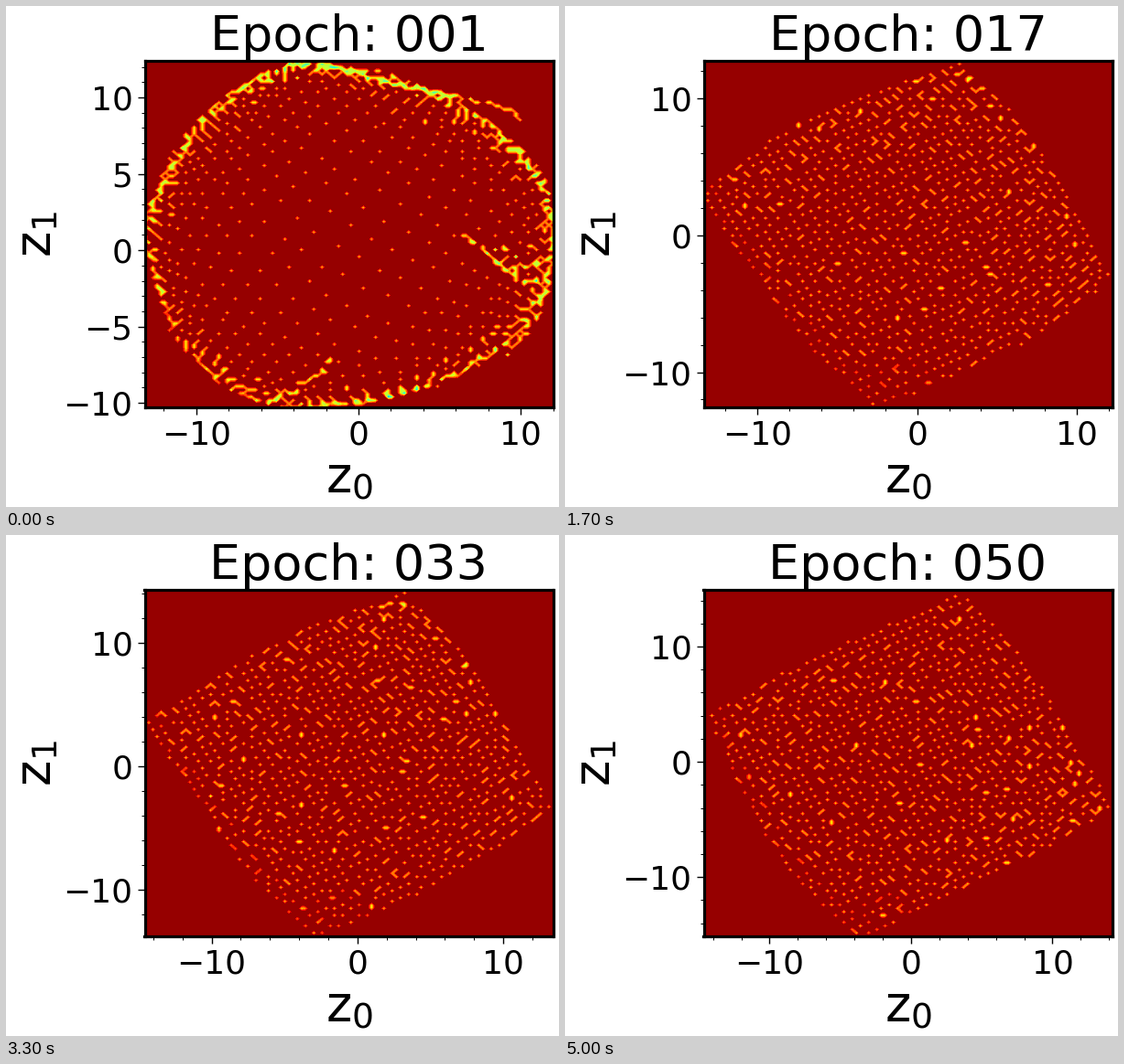
Recreate the animation shown at these times as a matplotlib script. Size 604 by 548 pixels, loop 5.1 s.

```python
import numpy as np
import matplotlib.pyplot as plt
from matplotlib.animation import FuncAnimation
from matplotlib.ticker import AutoMinorLocator, MultipleLocator

WIDTH, HEIGHT = 604, 548
LEFT, RIGHT, TOP, BOTTOM = 151.5, 597.5, 59.5, 439
BINS, SIDE, EPOCHS = 100, 32, 50

KEY_EPOCHS = [1, 13, 21, 28, 37, 44, 50]
# x min, x max, y min, y max
LIMITS = [
    (-13.18, 12.00, -10.29, 12.43),
    (-12.47, 11.25, -11.27, 11.73),
    (-14.23, 13.13, -13.87, 13.83),
    (-14.41, 13.12, -13.16, 13.47),
    (-14.74, 13.66, -14.34, 15.08),
    (-14.09, 12.94, -14.24, 14.53),
    (-14.66, 14.21, -15.14, 14.96),
]
# Cloud outline: left, top, right, bottom corners, then the middles between them
OUTLINES = [
    [(153, 235), (320, 60), (590, 190), (420, 428),
     (215, 125), (480, 98), (575, 340), (230, 412)],
    [(157, 212), (425, 64), (588, 295), (350, 436),
     (280, 122), (515, 160), (505, 375), (230, 325)],
    [(156, 192), (440, 66), (596, 288), (325, 428),
     (290, 118), (515, 160), (475, 365), (228, 312)],
    [(158, 202), (440, 68), (594, 298), (330, 435),
     (300, 125), (520, 165), (480, 372), (232, 315)],
    [(156, 207), (434, 63), (587, 295), (335, 435),
     (290, 122), (515, 160), (475, 375), (235, 325)],
    [(155, 195), (440, 64), (594, 297), (322, 432),
     (290, 125), (525, 165), (465, 365), (222, 300)],
    [(163, 195), (435, 62), (592, 296), (318, 436),
     (298, 128), (525, 180), (465, 370), (220, 322)],
]
# Folds and rims of the early, crumpled cloud
CREASES = [
    [(498, 250), (515, 258), (560, 302), (590, 300)],
    [(528, 268), (552, 265)],
    [(535, 281), (560, 273)],
    [(545, 290), (585, 280)],
    [(357, 384), (335, 408), (318, 420), (290, 430)],
    [(340, 62), (400, 80), (480, 97), (552, 112), (562, 128)],
    [(592, 302), (580, 340), (545, 385)],
]

rng = np.random.default_rng(7)
axis = np.linspace(-1, 1, SIDE)
GRID_U, GRID_V = (g.ravel() for g in np.meshgrid(axis, axis))
JITTER = rng.normal(0, 1.2, (SIDE * SIDE, 2))
near_bottom = (GRID_U < -0.9) | ((GRID_V > 0.8) & (GRID_U < -0.6))
WEIGHTS = np.where(near_bottom & (rng.random(SIDE * SIDE) < 0.6), 0.62, 1.0)


def at_epoch(epoch, keys):
    """Interpolate a stack of key values at the given epoch."""
    keys = np.array(keys, float)
    flat = keys.reshape(len(keys), -1)
    values = [np.interp(epoch, KEY_EPOCHS, column) for column in flat.T]
    return np.reshape(values, keys.shape[1:])


def warp(u, v, nodes):
    """Map the square onto an eight-node quadratic patch."""
    corners = [(-1, -1), (1, -1), (1, 1), (-1, 1)]
    shape = [(1 + u * a) * (1 + v * b) * (u * a + v * b - 1) / 4
             for a, b in corners]
    shape += [(1 - u**2) * (1 - v) / 2, (1 + u) * (1 - v**2) / 2,
              (1 - u**2) * (1 + v) / 2, (1 - u) * (1 - v**2) / 2]
    return np.array(shape).T @ nodes


def sample_line(points, step=5):
    points = np.array(points, float)
    lengths = np.hypot(*np.diff(points, axis=0).T)
    along = np.concatenate([[0], np.cumsum(lengths)])
    t = np.arange(0, along[-1], step)
    return np.column_stack([np.interp(t, along, c) for c in points.T])


CREASE_POINTS = np.vstack([sample_line(line) for line in CREASES])
CREASE_POINTS += rng.normal(0, 0.8, CREASE_POINTS.shape)
CREASE_ORDER = rng.permutation(len(CREASE_POINTS))


def cloud(epoch):
    squeeze = 1.9 * np.exp(-(epoch - 1) / 7) + 0.01
    radius = np.maximum(abs(GRID_U), abs(GRID_V))
    scale = np.tanh(squeeze * radius) / np.tanh(squeeze) / radius
    points = warp(GRID_U * scale, GRID_V * scale, at_epoch(epoch, OUTLINES))

    noise = np.random.default_rng(epoch)
    points += JITTER + noise.normal(0, 0.7, points.shape)
    phase = noise.uniform(0, 2 * np.pi, 2)
    points[:, 0] += 1.8 * np.sin(4 * GRID_V + phase[0])
    points[:, 1] += 1.8 * np.sin(4 * GRID_U + phase[1])

    kept = int(len(CREASE_POINTS) * max(0, 1 - (epoch - 1) / 6))
    points = np.vstack([points, CREASE_POINTS[CREASE_ORDER[:kept]]])
    return points, np.concatenate([WEIGHTS, np.ones(kept)])


def energy(epoch):
    points, weights = cloud(epoch)
    col = (points[:, 0] - LEFT) / (RIGHT - LEFT) * (BINS - 1)
    row = (BOTTOM - points[:, 1]) / (BOTTOM - TOP) * (BINS - 1)
    col, row = (np.clip(np.rint(i), 0, BINS - 1).astype(int) for i in (col, row))
    counts = np.zeros((BINS, BINS))
    np.add.at(counts, (row, col), weights)
    return 1 - np.minimum(0.4 * counts**0.68, 0.85)


def pt(pixels):
    return pixels * 0.72


def label(x, y, text, **style):
    return fig.text(x / WIDTH, 1 - y / HEIGHT, text, fontsize=pt(54),
                    ha="center", va="baseline", **style)


plt.rcParams["font.family"] = "DejaVu Sans"
fig = plt.figure(figsize=(WIDTH / 100, HEIGHT / 100), dpi=100, facecolor="white")
ax = fig.add_axes([LEFT / WIDTH, 1 - BOTTOM / HEIGHT,
                   (RIGHT - LEFT) / WIDTH, (BOTTOM - TOP) / HEIGHT])
ax.tick_params(labelsize=pt(36), length=pt(8), width=pt(1.4), pad=pt(5))
ax.tick_params(which="minor", length=pt(4), width=pt(1))
ax.xaxis.set_major_locator(MultipleLocator(10))
for spine in ax.spines.values():
    spine.set_linewidth(pt(3.2))
title = label(374.5, 49.5, "")
label(375, 532, r"z$_0$")
label(48, 249, r"z$_1$", rotation=90, rotation_mode="anchor")

LEVELS = np.linspace(0, 1, 26)
contours = []


def draw(frame):
    epoch = min(max(frame, 1), EPOCHS)
    while contours:
        contours.pop().remove()
    x0, x1, y0, y1 = at_epoch(epoch, LIMITS)
    contours.append(ax.contourf(
        np.linspace(x0, x1, BINS), np.linspace(y0, y1, BINS),
        energy(epoch), levels=LEVELS, cmap="jet", vmin=0, vmax=1))
    ax.set(xlim=(x0, x1), ylim=(y0, y1))
    ax.yaxis.set_major_locator(MultipleLocator(5 if y1 - y0 < 25 else 10))
    ax.xaxis.set_minor_locator(AutoMinorLocator(5))
    ax.yaxis.set_minor_locator(AutoMinorLocator(5))
    title.set_text(f"Epoch: {epoch:03d}")
    return [title]


# The first epoch holds for two ticks
animation = FuncAnimation(fig, draw, frames=EPOCHS + 1, interval=100,
                          init_func=lambda: [], repeat=True, repeat_delay=0)
plt.show()
```
